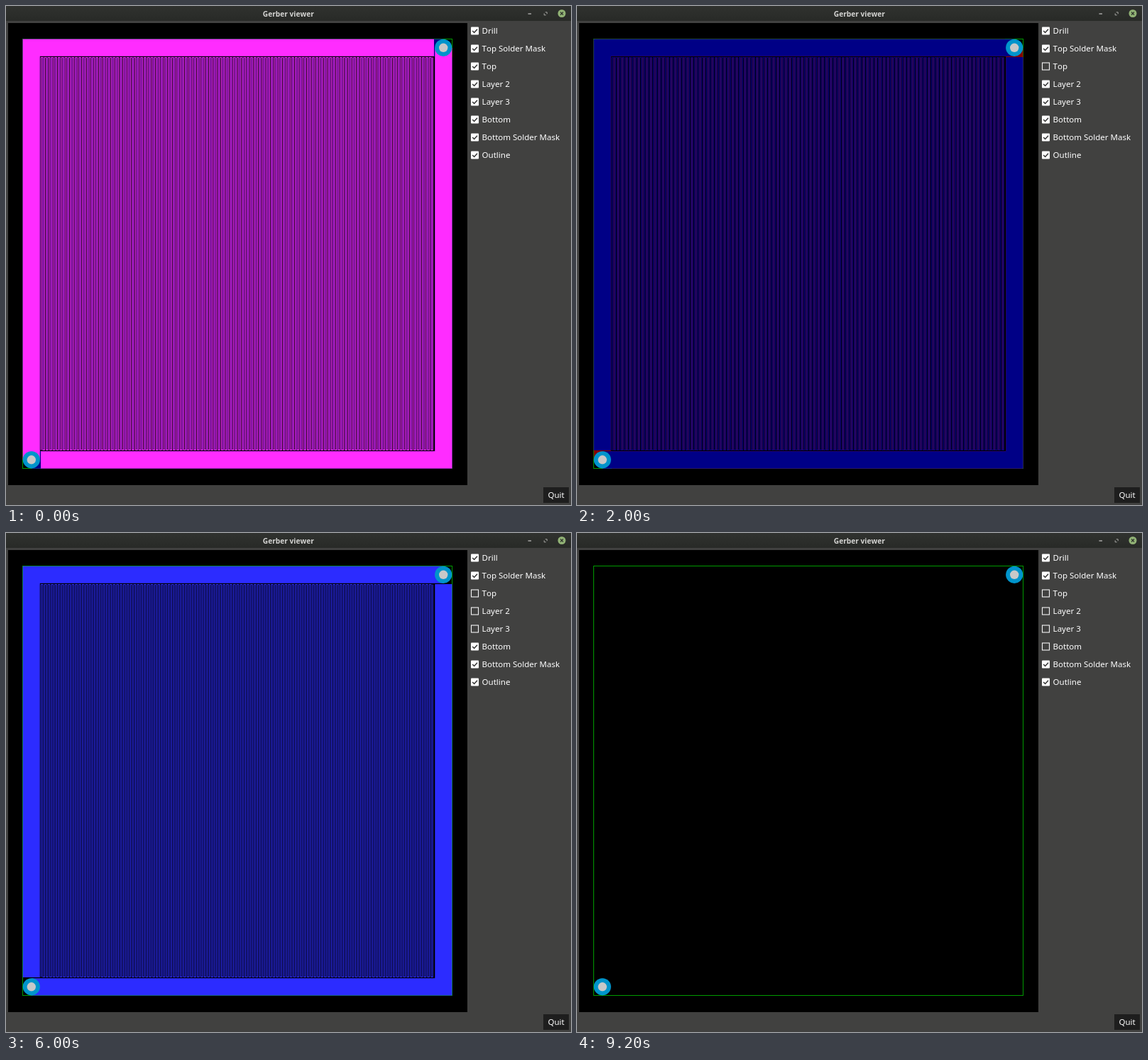
Animation, 796 px wide and 703 px high, one loop 10 s. Source, as an HTML page with a canvas:

```html
<!DOCTYPE html>
<html lang="en">
<head>
<meta charset="utf-8">
<title>Gerber viewer</title>
<style>
html, body { margin: 0; width: 100%; height: 100%; overflow: hidden; background: #414140; }
canvas { display: block; }
</style>
</head>
<body>
<canvas id="stage" width="796" height="703"></canvas>
<script>
const ctx = document.getElementById('stage').getContext('2d');
const FONT = '"Noto Sans", "Open Sans", sans-serif';
const STEP = 2000;
const LABELS = ['Drill', 'Top Solder Mask', 'Top', 'Layer 2', 'Layer 3',
  'Bottom', 'Bottom Solder Mask', 'Outline'];
const COPPER = [
  { color: '#ff2cff', upright: true },
  { color: '#000086', upright: false },
  { color: '#860000', upright: true },
  { color: '#2c2cff', upright: false }
];

// Fill the area between two corners
function box(x0, y0, x1, y1, color) {
  ctx.fillStyle = color;
  ctx.fillRect(x0, y0, x1 - x0, y1 - y0);
}

function disc(x, y, r, color) {
  ctx.fillStyle = color;
  ctx.beginPath();
  ctx.arc(x, y, r, 0, Math.PI * 2);
  ctx.fill();
}

function line(points, color, width) {
  ctx.strokeStyle = color;
  ctx.lineWidth = width;
  ctx.beginPath();
  points.forEach(([x, y]) => ctx.lineTo(x, y));
  ctx.stroke();
}

function text(str, x, y, font, color, align = 'left') {
  ctx.font = font + ' ' + FONT;
  ctx.fontKerning = 'none';
  ctx.fillStyle = color;
  ctx.textAlign = align;
  ctx.fillText(str, x, y);
}

// One long winding trace, 0.2 mm wide with 0.2 mm gaps, on a 100 mm board
const MM = 6.05;
const TRACE = 0.2 * MM;
const TURNS = 229;
const coil = [];
for (let i = 0; i < TURNS; i++) {
  const x = 49.5 + i * TRACE * 2;
  const ends = i % 2 ? [72.5, 625.5] : [625.5, 72.5];
  ends.forEach(y => coil.push([x, y]));
}

function drawCopper({ color, upright }) {
  const l = 23.7, t = 46.7, r = 628.4, b = 651.4;
  ctx.fillStyle = color;
  ctx.beginPath();
  // Upper left and lower right arms; the long end of each meets a pad
  const arms = upright
    ? [[[l, t], [603, t], [603, 70.8], [47.8, 70.8], [47.8, 639], [l, 639]],
       [[r, b], [49, b], [49, 627.3], [604.3, 627.3], [604.3, 59], [r, 59]]]
    : [[[l, t], [616, t], [616, 70.8], [47.8, 70.8], [47.8, 626], [l, 626]],
       [[r, b], [36, b], [36, 627.3], [604.3, 627.3], [604.3, 72], [r, 72]]];
  for (const arm of arms) {
    arm.forEach(([x, y], i) => i ? ctx.lineTo(x, y) : ctx.moveTo(x, y));
    ctx.closePath();
  }
  ctx.fill();
  line(coil, color, TRACE);
}

function drawBoard(hidden) {
  box(3, 24, 650, 675, '#000');
  ctx.strokeStyle = '#009a00';
  ctx.lineWidth = 1;
  ctx.strokeRect(23.5, 46.5, 605, 605);
  for (let i = COPPER.length - 1; i >= hidden; i--) drawCopper(COPPER[i]);
  for (const [x, y] of [[616.2, 58.8], [35.8, 639.3]]) {
    disc(x, y, 12.1, '#0094cb');
    disc(x, y, 6.2, '#c8c8c8');
  }
}

function drawCheck(y, on) {
  if (!on) {
    ctx.strokeStyle = '#f4f4f4';
    ctx.lineWidth = 1.1;
    ctx.strokeRect(655.5, y - 5, 10, 10);
    return;
  }
  ctx.fillStyle = '#fff';
  ctx.beginPath();
  ctx.roundRect(655, y - 5.5, 11, 11, 1);
  ctx.fill();
  line([[657.2, y], [659.6, y + 2.5], [664, y - 2.2]], '#333', 1.5);
}

function drawWindow() {
  box(0, 0, 796, 703, '#414140');
  const bar = ctx.createLinearGradient(0, 0, 0, 21);
  bar.addColorStop(0, '#30322f');
  bar.addColorStop(1, '#282a27');
  box(0, 0, 796, 21, bar);
  text('Gerber viewer', 397.8, 15, 'bold 10.2px', '#d3d3d1', 'center');
  line([[735.5, 11], [740, 11]], '#c4c4c2', 1.2);
  line([[759.8, 8.8], [762.2, 8.8], [762.2, 11.2]], '#a8a8a6', 1);
  line([[758.2, 10.4], [758.2, 12.8], [760.6, 12.8]], '#a8a8a6', 1);
  disc(783, 10.5, 5.5, '#91b275');
  line([[781, 8.5], [785, 12.5]], '#2c302a', 1.1);
  line([[785, 8.5], [781, 12.5]], '#2c302a', 1.1);
  box(757, 678, 793, 700, '#1e1e1e');
  text('Quit', 775, 693, '11.5px', '#fff', 'center');
}

function draw(hidden) {
  drawWindow();
  drawBoard(hidden);
  LABELS.forEach((label, i) => {
    const y = 35 + i * 25;
    drawCheck(y, i < 2 || i >= 2 + hidden || i > 5);
    text(label, 670.6, y + 4.2, '11.5px', '#fff');
  });
}

let shown = -1;
function tick() {
  const hidden = Math.floor(performance.now() / STEP) % 5;
  if (hidden !== shown) draw(shown = hidden);
  requestAnimationFrame(tick);
}
tick();
</script>
</body>
</html>
```
